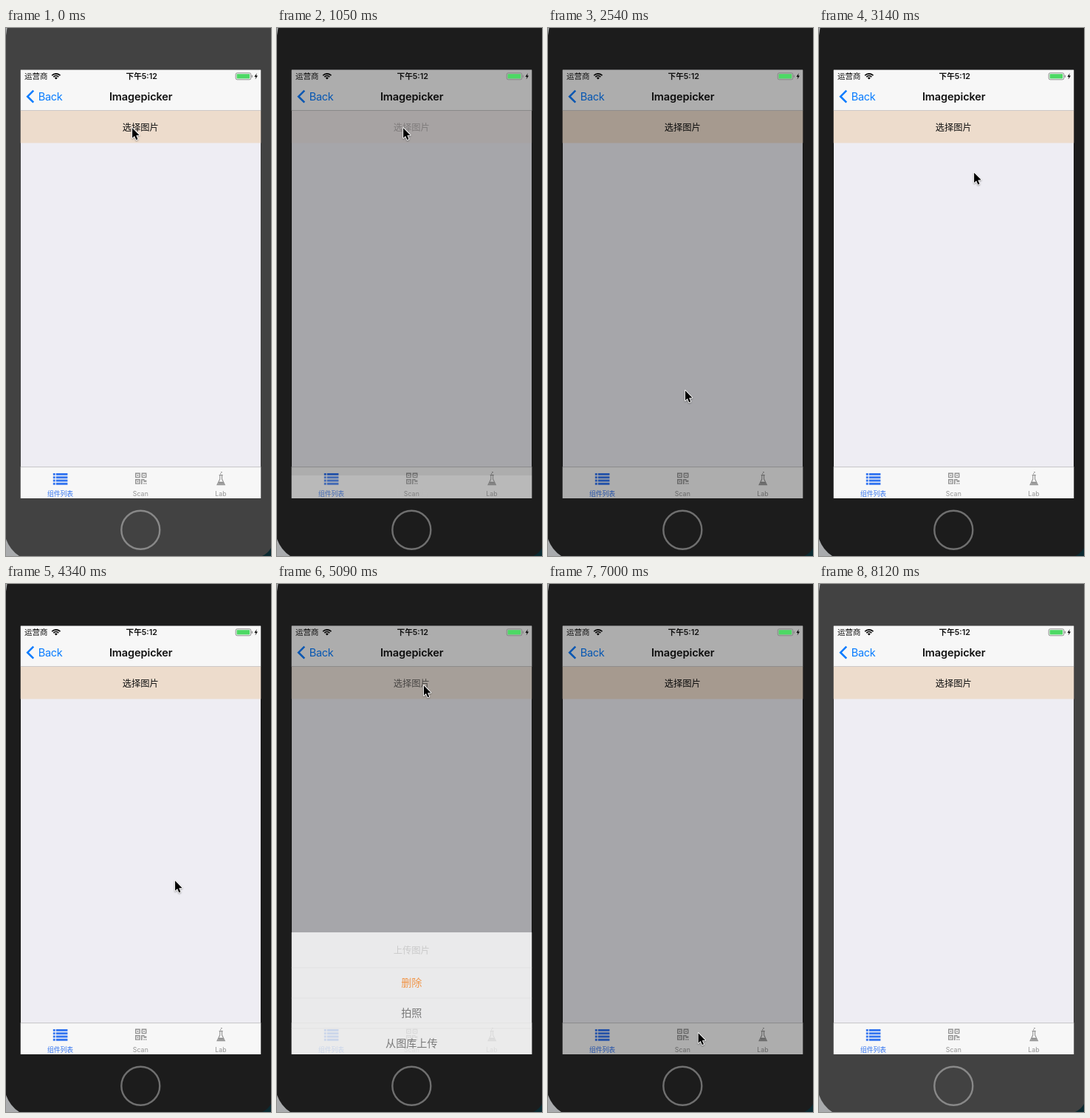
An HTML page with a canvas that plays this animation: 359 by 714 pixels, repeating every 8220 ms.

```html
<!DOCTYPE html>
<html lang="zh">
<head>
<meta charset="utf-8">
<title>Imagepicker</title>
<style>
html, body { margin: 0; width: 100%; height: 100%; overflow: hidden; background: #424242; }
canvas { display: block; width: 359px; height: 714px; }
</style>
</head>
<body>
<canvas id="stage"></canvas>
<script>
const W = 359, H = 714, LOOP = 8220, FOCUS = 1050, BLUR = 8120;
const LEFT = 19.5, TOP = 56.5, WIDTH = 326, BOTTOM = 636, MID = 182.3;
const ROW = 41, HEAD = 47.5, SHEET_H = 217;
const LATIN = 'Inter, "Noto Sans CJK SC", "Noto Sans CJK", sans-serif';
const CJK = '"Noto Sans CJK SC", "Noto Sans CJK", sans-serif';
const BLUE = '#087cff', TAB_BLUE = '#3576f0', GREY = '#929292', HAIRLINE = '#b9b9bb';

const canvas = document.getElementById('stage');
const ctx = canvas.getContext('2d');
const dpr = window.devicePixelRatio || 1;
canvas.width = W * dpr;
canvas.height = H * dpr;

const clamp = v => Math.min(1, Math.max(0, v));
const smooth = u => u * u * (3 - 2 * u);
const easeOut = u => 1 - (1 - u) ** 3;

// Spans in which the picture updates, about every 150 ms
const spans = [[1050, 2090], [2390, 2690], [2990, 3290], [3590, 3890],
  [4190, 5230], [5380, 5970], [6410, 7450]];

function heldTime(t) {
  if (t >= BLUR) return BLUR;
  const span = spans.findLast(s => s[0] <= t);
  if (!span) return 0;
  const [a, b] = span;
  const step = (b - a) / Math.round((b - a) / 150);
  const n = Math.floor((Math.min(t, b) - a + 6) / step);
  return a + n * step;
}

// Pointer stops: time, x, y
const stops = [
  [1350, 170.5, 135], [2090, 187, 388], [2390, 185.3, 485], [2690, 185.3, 495],
  [3290, 214, 140], [3890, 240, 156], [4339, 228.5, 401], [4785, 198.3, 137],
  [5082, 198.3, 137], [5970, 203, 600], [7005, 203, 607], [7302, 208, 686]
];

function pointerAt(t) {
  const i = stops.findIndex(s => s[0] > t);
  if (i <= 0) return (i ? stops.at(-1) : stops[0]).slice(1);
  const [t0, x0, y0] = stops[i - 1], [t1, x1, y1] = stops[i];
  const u = smooth((t - t0) / (t1 - t0));
  return [x0 + (x1 - x0) * u, y0 + (y1 - y0) * u];
}

// Each visit of the sheet: tapped open, then dismissed
const visits = [{ open: 1030, close: 2240 }, { open: 4930, close: 6704 }];

function sheetState(t) {
  const visit = visits.findLast(v => v.open <= t);
  if (!visit) return { rise: 0, dim: false, button: 1 };
  const age = t - visit.open, leaving = t - visit.close;
  return {
    rise: easeOut(clamp(age / 400)) * (1 - clamp(leaving / 300)),
    dim: leaving < 445,
    button: 0.2 + 0.8 * clamp(age / 300)
  };
}

function rect(x, y, w, h, color) {
  ctx.fillStyle = color;
  ctx.fillRect(x, y, w, h);
}

function label(s, x, y, size, color, { weight = 400, align = 'center', font = CJK, gap = 0 } = {}) {
  ctx.font = `${weight} ${size}px ${font}`;
  ctx.letterSpacing = gap + 'px';
  ctx.textAlign = align;
  ctx.fillStyle = color;
  ctx.fillText(s, x, y);
  ctx.letterSpacing = '0px';
}

function poly(...points) {
  ctx.beginPath();
  for (const [x, y] of points) ctx.lineTo(x, y);
}

function fill(color) {
  ctx.fillStyle = color;
  ctx.fill();
}

function stroke(color, width) {
  ctx.strokeStyle = color;
  ctx.lineWidth = width;
  ctx.stroke();
}

function drawCorner(edge, y, x, color) {
  ctx.beginPath();
  ctx.moveTo(edge, y);
  ctx.quadraticCurveTo(edge + (x - edge) * 0.3, y + (H - y) * 0.65, x, H);
  ctx.lineTo(edge, H);
  fill(color);
}

function drawBody(active) {
  rect(0, 0, W, H, active ? '#1c1c1c' : '#424242');
  poly([0, 0], [1.5, 0], [0, 10]);
  fill('#b4b6b8');
  drawCorner(0, 691, 18, '#a9abad');
  drawCorner(W, 703, 347, '#0b2a31');
  ctx.beginPath();
  ctx.arc(MID, 678.8, 26, 0, Math.PI * 2);
  stroke(active ? '#6f6f6f' : '#888', 2.4);
}

function drawListIcon() {
  for (let y = 602; y < 618; y += 4.3) {
    rect(63.8, y, 2.9, 2.9, TAB_BLUE);
    rect(67.8, y, 15.6, 2.9, TAB_BLUE);
  }
}

function drawScanIcon() {
  for (const [x, y] of [[175, 601.5], [183.6, 601.5], [175, 610]]) {
    ctx.beginPath();
    ctx.rect(x + 0.7, y + 0.7, 5.4, 5.4);
    stroke(GREY, 1.4);
    rect(x + 2.5, y + 2.5, 1.8, 1.8, GREY);
  }
  rect(183, 610, 1.6, 7, GREY);
  rect(184.6, 610, 3, 1.6, GREY);
  rect(186.5, 611.6, 3.9, 2.2, GREY);
  rect(186.3, 615.3, 1.5, 1.5, GREY);
  rect(188.9, 615.3, 1.5, 1.5, GREY);
}

function drawLabIcon() {
  rect(288.7, 604, 5, 1.2, GREY);
  poly([289.8, 605], [289.8, 610], [286, 617.6], [296.4, 617.6], [292.6, 610], [292.6, 605]);
  stroke(GREY, 1.1);
  poly([288.3, 613.5], [294.2, 613.8], [295.5, 616.8], [287, 616.8]);
  fill(GREY);
  rect(291.2, 600, 1.5, 1.5, GREY);
  rect(290, 602.1, 1.2, 1.2, GREY);
}

function drawPage(buttonAlpha) {
  rect(LEFT + 0.5, TOP, WIDTH - 1, BOTTOM - TOP, '#eeedf3');
  rect(LEFT, TOP, WIDTH, 55, '#f7f7f7');
  rect(LEFT, 111, WIDTH, 0.8, HAIRLINE);
  poly([37.2, 84.7], [29.2, 92.7], [37.2, 100.7]);
  stroke(BLUE, 2.6);
  label('Back', 43.8, 98, 14.5, BLUE, { align: 'left', font: LATIN, gap: -0.3 });
  label('Imagepicker', MID + 0.4, 98, 14.5, '#111', { weight: 600, font: LATIN, gap: -0.1 });

  ctx.globalAlpha = buttonAlpha;
  rect(LEFT, 111.8, WIDTH, 43.7, '#eddccc');
  label('选择图片', MID, 138.8, 12.3, '#111');
  ctx.globalAlpha = 1;

  rect(LEFT, 593.5, WIDTH, BOTTOM - 593.5, '#f7f7f7');
  rect(LEFT, 593.3, WIDTH, 0.8, HAIRLINE);
  drawListIcon();
  drawScanIcon();
  drawLabIcon();
  label('组件列表', 73.5, 633.4, 8.8, TAB_BLUE);
  label('Scan', MID, 633, 8.7, GREY, { font: LATIN, gap: 0.15 });
  label('Lab', 291, 633, 8.7, GREY, { font: LATIN, gap: 0.15 });
}

function drawWifi(x, y) {
  const fan = [-Math.PI * 0.76, -Math.PI * 0.24];
  for (const r of [4.8, 7.7]) {
    ctx.beginPath();
    ctx.arc(x, y, r, ...fan);
    stroke('#000', 1.7);
  }
  ctx.beginPath();
  ctx.moveTo(x, y);
  ctx.arc(x, y, 2.8, ...fan);
  fill('#000');
}

function drawStatus() {
  label('运营商', 25, 69.2, 10.5, '#111', { align: 'left' });
  label('下午5:12', 183.7, 69.2, 10.7, '#111', { weight: 600, font: LATIN });
  drawWifi(67.8, 69.5);
  ctx.beginPath();
  ctx.roundRect(311.2, 60.8, 20.6, 9, 2);
  stroke('#858585', 0.9);
  rect(312.6, 62.2, 17.6, 6.2, '#4cd964');
  rect(332.7, 63.8, 1.2, 3, '#858585');
  poly([339.8, 61], [336.5, 65.9], [338.6, 65.9], [337.6, 69.6], [341, 64.6], [338.9, 64.6]);
  fill('#000');
}

// The sheet fades in as it rises
function drawSheet(rise) {
  const top = BOTTOM - SHEET_H * rise;
  ctx.globalAlpha = rise;
  rect(LEFT, top, WIDTH, SHEET_H, '#fff');
  label('上传图片', MID, top + 28.7, 12.3, '#c0c0c0');
  ['删除', '拍照', '从图库上传'].forEach((s, i) => {
    const y = top + HEAD + i * ROW;
    rect(LEFT, y, WIDTH, 0.8, '#dcdcdc');
    label(s, MID, y + 25.8, 14.1, i ? '#555' : '#f27c18');
  });
  const end = top + HEAD + 3 * ROW;
  rect(LEFT, end, WIDTH, 5.2, '#e7e7ed');
  label('取消', MID, end + 31, 14.1, '#555');
  ctx.globalAlpha = 1;
}

function drawPointer(x, y) {
  ctx.save();
  ctx.translate(x + 0.6, y + 0.2);
  poly([0, 0], [0, 13.6], [3, 10.8], [5.3, 16], [7.4, 15.1], [5.2, 10], [9.5, 9.7]);
  ctx.closePath();
  ctx.lineJoin = 'round';
  ctx.shadowColor = 'rgba(0,0,0,.35)';
  ctx.shadowBlur = 2 * dpr;
  ctx.shadowOffsetY = dpr;
  stroke('#fff', 1.8);
  ctx.shadowColor = 'transparent';
  fill('#000');
  ctx.restore();
}

function draw(t) {
  const { rise, dim, button } = sheetState(t);
  ctx.setTransform(dpr, 0, 0, dpr, 0, 0);
  drawBody(t >= FOCUS && t < BLUR);
  ctx.save();
  ctx.beginPath();
  ctx.rect(LEFT, TOP, WIDTH, BOTTOM - TOP);
  ctx.clip();
  drawPage(button);
  if (dim) rect(0, 0, W, H, 'rgba(0,0,0,.3)');
  drawStatus();
  drawSheet(rise);
  ctx.restore();
  if (t < 7440) drawPointer(...pointerAt(t));
}

const start = performance.now();
function frame() {
  draw(heldTime((performance.now() - start) % LOOP));
  requestAnimationFrame(frame);
}
frame();
</script>
</body>
</html>
```
